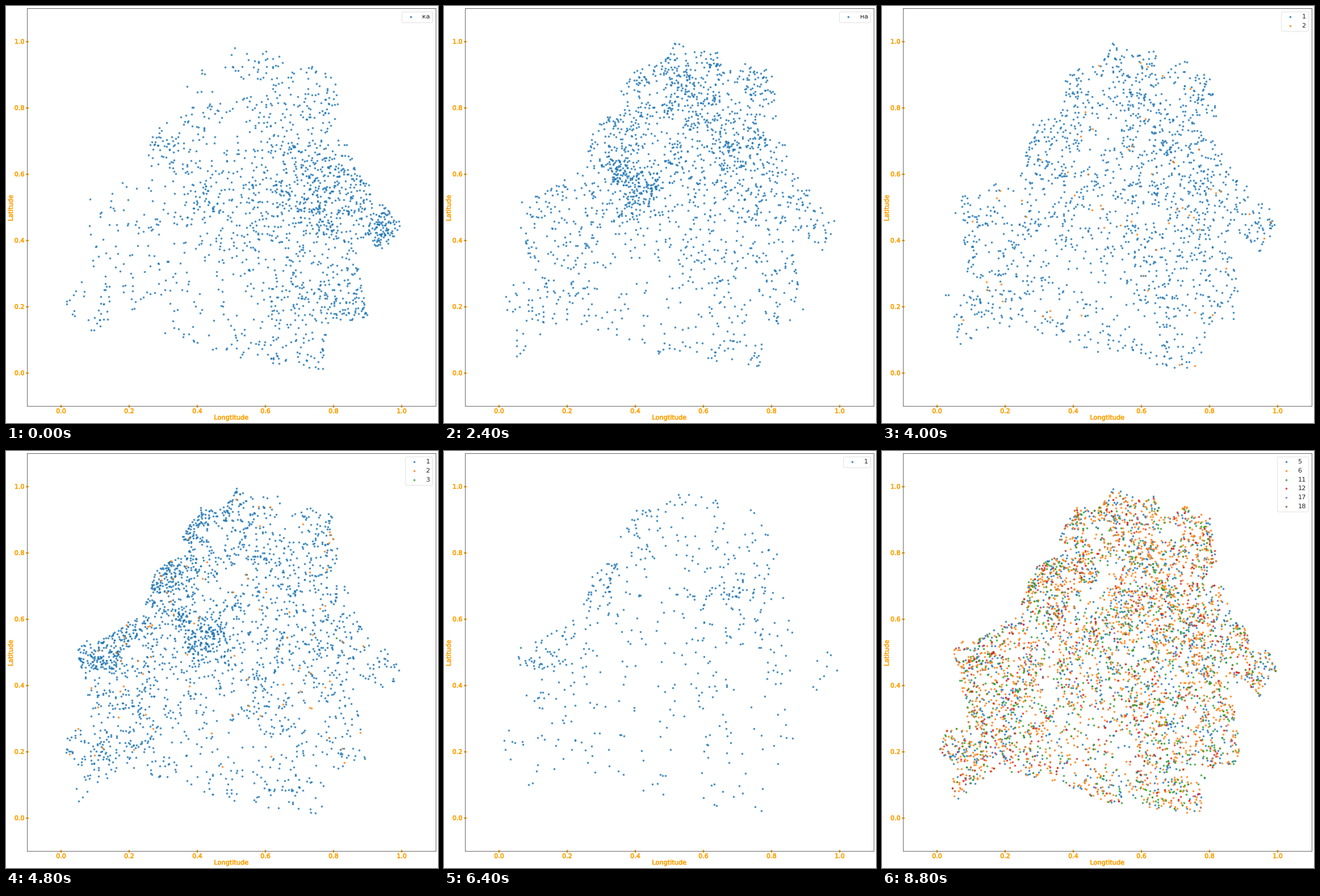
Write a matplotlib script that moves like this. It is 761 px wide and 736 px high and loops after 9.6 s.

```python
import numpy as np
import matplotlib.pyplot as plt
from matplotlib import patheffects
from matplotlib.animation import FuncAnimation
from matplotlib.path import Path

W, H, DPI = 761, 736, 80
ORANGE = "#ffa000"
COLORS = ["#1f77b4", "#ff7f0e", "#2ca02c", "#d62728", "#9467bd", "#8c564b"]

# Corners of the country in percent of the axis units, clockwise from the north.
BORDER = Path(np.array([
    (52, 100), (57, 97), (64, 97), (66, 91), (73, 94), (80, 91), (82, 77),
    (77, 71), (84, 70), (87, 60), (91, 57), (92, 51), (97, 51), (100, 44),
    (94, 36), (90, 41), (86, 39), (88, 27), (90, 17), (79, 14), (77, 1),
    (65, 2), (58, 4), (48, 5), (38, 10), (17, 15), (4, 4), (5, 16), (0, 20),
    (3, 27), (9, 28), (8, 36), (4, 53), (12, 54), (24, 62), (28, 75),
    (38, 81), (35, 84), (41, 94), (47, 93),
]) / 100)


def spot(points, x, y, r):
    return np.exp(-((points - (x, y)) ** 2).sum(1) / (2 * r * r))


def frontier(points):
    """Closeness to the slanted north-western border."""
    x, y = points.T
    return np.exp(-((y - .3 - 1.6 * x) / .13) ** 2) * (y > .45)


def make_villages():
    """Scatter even and clustered places, thinned by lakes and marshes."""
    rng = np.random.default_rng(7)
    even = rng.random((22000, 2))
    clumps = np.repeat(rng.random((800, 2)), 12, axis=0)
    clumps += rng.normal(0, .013, clumps.shape)
    points = np.vstack([even, clumps])
    points = points[BORDER.contains_points(points)]

    keep = 1 - .65 * spot(points, .42, .22, .13)
    for x, y in [(.33, .52), (.52, .76), *rng.random((25, 2))]:
        keep *= 1 - .9 * spot(points, x, y, rng.uniform(.014, .028))
    return points[rng.random(len(points)) < keep]


VILLAGES = make_villages()


def layer(seed, count, east=0, north=0, edge=0, spots=()):
    """Pick villages by a density slope, the frontier and a few hot spots."""
    rng = np.random.default_rng(seed)
    density = np.exp((VILLAGES - .5) @ (east, north))
    density += edge * frontier(VILLAGES)
    for x, y, r, weight in spots:
        density += weight * spot(VILLAGES, x, y, r)
    picks = rng.choice(len(VILLAGES), count, False, density / density.sum())
    return VILLAGES[picks]


def mixed(seed, sizes):
    return [layer(seed + i, size, -.3, .5, .5) for i, size in enumerate(sizes)]


ka = layer(1, 1700, 1.8, -.2,
           spots=[(.94, .44, .05, 4), (.76, .57, .1, 2), (.79, .23, .06, 1.5),
                  (.45, .47, .07, 1.5), (.28, .68, .04, 2)])
chy = layer(2, 1650, -1.4, -.2,
            spots=[(.29, .45, .06, 4), (.4, .6, .09, 2), (.16, .4, .07, 2)])
va = layer(3, 1800, .2, 1.3,
           spots=[(.52, .88, .06, 3), (.72, .69, .05, 5), (.29, .46, .06, 1)])
na = layer(4, 1900, -.2, 1.1,
           spots=[(.39, .58, .06, 6), (.53, .87, .09, 2), (.71, .69, .06, 2)])
ki = layer(5, 2300, -1, 1, 2.5)

ones = layer(6, 2350, -.8, 1, 4, spots=[(.41, .55, .05, 4)])
twos = layer(7, 85, -1, 1.5, 2)
threes = np.array([(.808, .542)])


def named(labels, *layers):
    return list(zip(labels.split(), layers))


SCENES = [
    named("ка", ka),
    named("ва", va),
    named("чы", chy),
    named("на", na),
    named("кі чы ка ва на", ki, chy, ka, va, na),
    named("1 2", layer(30, 1700, .3, .6), layer(31, 60)),
    named("1 2 3", ones, twos, threes),
    named("1 2 3 4", *mixed(40, [2300, 1500, 500, 90])),
    named("1", layer(8, 570, -.6, 1.2, 4, spots=[(.71, .67, .05, 4)])),
    named("1", layer(9, 520, .3, .5)),
    named("ча", layer(10, 530, 1, .5, spots=[(.55, .6, .17, 2.5)])),
    named("5 6 11 12 17 18", *mixed(50, [1650, 2300, 850, 470, 70, 6])),
]

plt.rcParams.update({"font.family": "DejaVu Sans", "font.size": 10.2})
fig = plt.figure(figsize=(W / DPI, H / DPI), dpi=DPI, facecolor="white")
ax = fig.add_axes([37 / W, 30 / H, 720 / W, 702 / H])
ax.set(xlim=(-.1, 1.1), ylim=(-.1, 1.1))
ticks = np.arange(6) / 5
ax.set_xticks(ticks)
ax.set_yticks(ticks)
ax.tick_params(direction="inout", length=4.5, width=2.2, pad=1.8,
               color=ORANGE, labelcolor=ORANGE, labelsize=10)
for spine in ax.spines.values():
    spine.set(color="#555555", linewidth=.8)

texts = [
    fig.text(397 / W, 1 - 727 / H, "Longtitude", ha="center", va="center"),
    fig.text(9 / W, 1 - 356.5 / H, "Latitude", ha="center", va="center",
             rotation=90),
]
for text in texts + ax.get_xticklabels() + ax.get_yticklabels():
    text.set_color(ORANGE)
    text.set_path_effects(
        [patheffects.withStroke(linewidth=.5, foreground=ORANGE)])


def update(frame):
    for dots in list(ax.collections):
        dots.remove()
    for color, (label, points) in zip(COLORS, SCENES[frame]):
        ax.scatter(*points.T, s=10.5, color=color, alpha=.8, linewidths=0,
                   label=label)
    legend = ax.legend(loc="upper right", edgecolor="0.84",
                       labelcolor="#222222")
    legend.get_frame().set_linewidth(.8)
    return ax.collections


anim = FuncAnimation(fig, update, frames=len(SCENES), interval=800,
                     init_func=lambda: [], repeat=True, repeat_delay=0,
                     blit=False)
plt.show()
```
